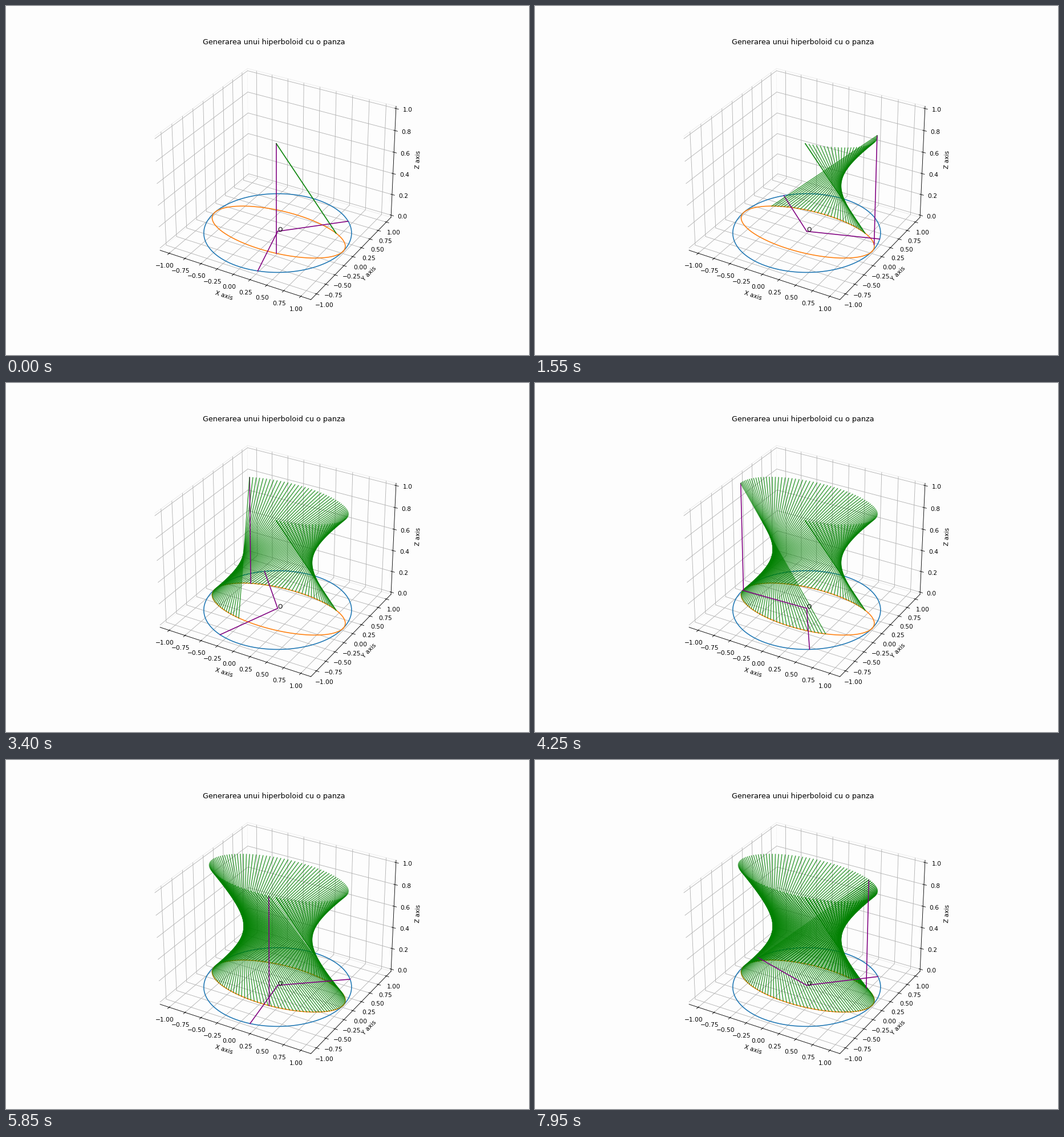
A matplotlib script for the animation above (8 s loop, 917x611 px).

```python
import numpy as np
import matplotlib.pyplot as plt
from matplotlib.animation import FuncAnimation
from mpl_toolkits.mplot3d.art3d import Line3DCollection

FRAMES, INTERVAL = 160, 50
TURN = 120                  # frames per turn, both ends included
START, TWIST = -75, 120     # degrees
A, B, H = 1.0, 0.5, 1.0     # ellipse half-axes, height
BG, EDGE = "#fdfdfd", "#eeeeee"
STYLE = dict(color="green", alpha=0.7)


def ring(deg, a=A, b=B, z=0.0):
    """Points of an ellipse at height z, one row per angle."""
    t = np.radians(deg)
    return np.stack([a * np.cos(t), b * np.sin(t), z + 0 * t], axis=-1)


fig = plt.figure(figsize=(12, 8), dpi=76.42, facecolor=BG)
ax = fig.add_subplot(projection="3d", computed_zorder=False)
ax.set_facecolor(BG)
ax.view_init(elev=30, azim=-60)

# Axis cube reaches 1/48 of the range past each limit
side = 1.1 * (1 + 1 / 24)
ax.set_xlim(-side, side)
ax.set_ylim(-side, side)
ax.set_zlim(-H / 48, H * (1 + 1 / 48))

for axis, name in zip((ax.xaxis, ax.yaxis, ax.zaxis), "XYZ"):
    axis.pane.set(facecolor=BG, edgecolor=EDGE, alpha=1)
    axis.set_label_text(f"{name} axis")
ax.set_title("Generarea unui hiperboloid cu o panza")
ax.text(0, 0, 0, "O")

turn = np.linspace(0, 360, 241)
ax.plot(*ring(turn, 1, 1).T)
ax.plot(*ring(turn).T)

angles = START + np.linspace(0, 360, TURN)[np.arange(FRAMES) % TURN]
rules = np.stack([ring(angles, z=H), ring(angles + TWIST)], axis=1)
rules = np.concatenate([rules[:1], rules])   # the first rule is drawn twice

trail = Line3DCollection(rules[:1], linewidths=1.5, capstyle="projecting",
                         zorder=2, **STYLE)
ax.add_collection3d(trail)
arms = [ax.plot([0], [0], [0], color="purple", zorder=2.1)[0] for _ in range(3)]
newest, = ax.plot([0], [0], [0], zorder=2.2, **STYLE)


def segment(line, p, q):
    line.set_data_3d(*np.array([p, q]).T)


def update(i):
    deg = angles[i]
    segment(arms[0], (0, 0, 0), ring(deg, 1, 1))
    segment(arms[1], (0, 0, 0), ring(deg + TWIST, 1, 1))
    segment(arms[2], ring(deg), ring(deg, z=H))
    trail.set_segments(rules[:i + 1])
    segment(newest, *rules[i + 1])
    return [trail, *arms, newest]


anim = FuncAnimation(fig, update, frames=FRAMES, interval=INTERVAL,
                     init_func=lambda: update(0), repeat=True, repeat_delay=0)
plt.show()
```
